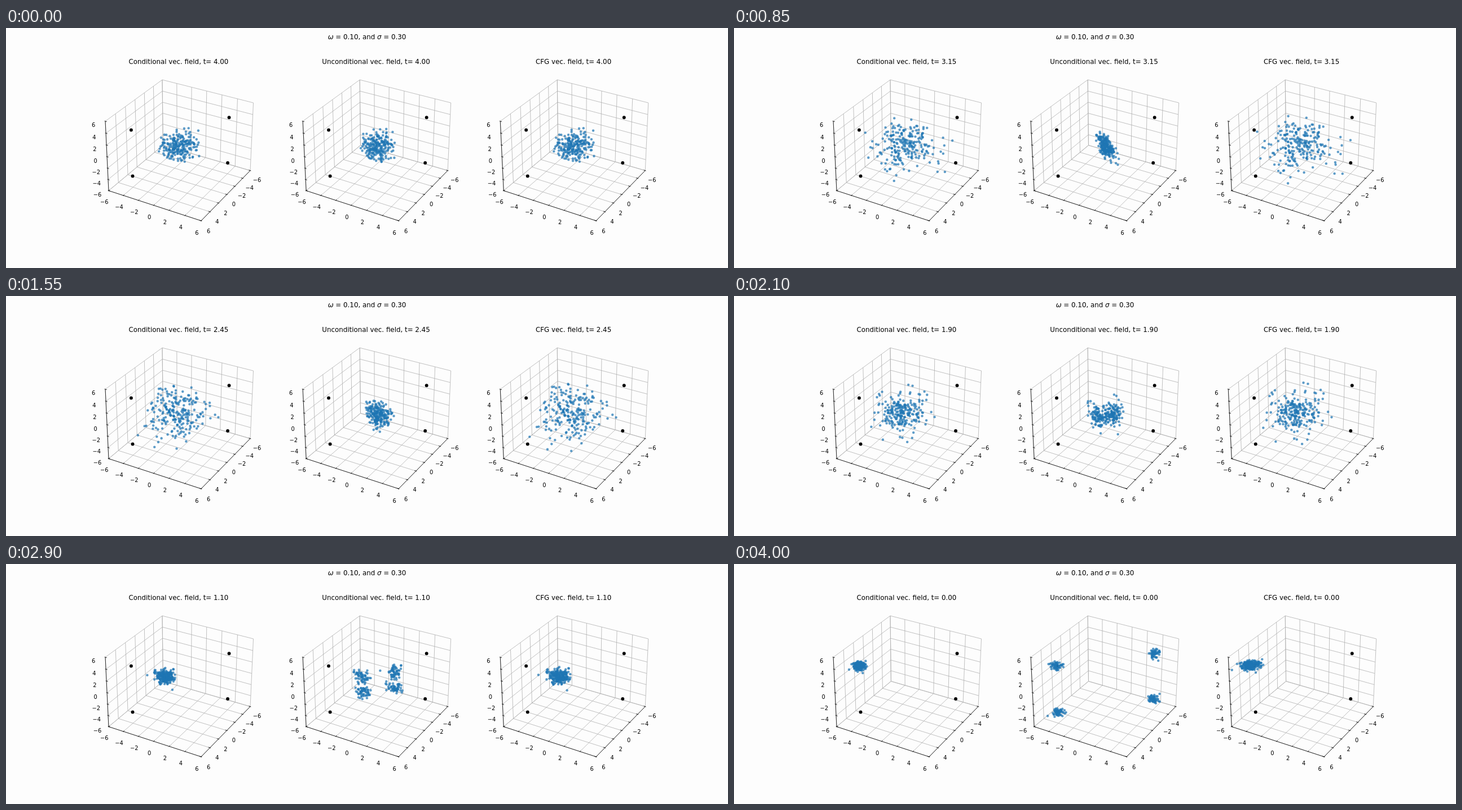
An HTML page with a canvas for the animation above (4.05 s loop, 1280x427 px).

```html
<!DOCTYPE html>
<html lang="en">
<head>
<meta charset="utf-8">
<title>Vector fields</title>
<style>
html, body { margin: 0; width: 100%; height: 100%; overflow: hidden; background: #fdfdfd; }
canvas { display: block; }
</style>
</head>
<body>
<canvas id="stage" width="1280" height="427"></canvas>
<script>
const ctx = document.getElementById('stage').getContext('2d');
const FRAMES = 81, FRAME_MS = 50, COUNT = 230;
const PT = 1280 / 18 / 72;            // pixels per typographic point
const PANEL_STEP = 350.118, TITLE_X = 305.88, TITLE_Y = 63.7;
const TICKS = [-6, -4, -2, 0, 2, 4, 6];
const LIMIT = 6, LABEL_GAP = 0.92;
const font = (points, style = '') => `${style} ${points * PT}px "DejaVu Sans", sans-serif`;

// Perspective view from azimuth 30 and elevation 30 degrees.
function project(x, y, z) {
  x *= 0.0992063; y *= 0.0992063; z *= 0.0744049;
  const right = -0.5 * x + 0.866025 * y;
  const up = -0.433013 * x - 0.25 * y + 0.866025 * z;
  const scale = 1577.4 / (10 - 0.75 * x - 0.433013 * y - 0.5 * z);
  return [309.83 + right * scale, 211.52 - up * scale];
}

// Seeded random numbers
let seed = 20817;
function random() {
  seed = (seed + 0x6D2B79F5) | 0;
  let r = Math.imul(seed ^ (seed >>> 15), 1 | seed);
  r = (r + Math.imul(r ^ (r >>> 7), 61 | r)) ^ r;
  return ((r ^ (r >>> 14)) >>> 0) / 4294967296;
}
const gauss = () => Math.sqrt(-2 * Math.log(1 - random())) * Math.cos(2 * Math.PI * random());

// Each particle carries three slowly wandering unit normals.
const KEEP = 0.92, KICK = Math.sqrt(1 - KEEP * KEEP);
const particles = Array.from({ length: COUNT }, (_, i) => {
  const path = [[gauss(), gauss(), gauss()]];
  while (path.length < FRAMES) path.push(path[path.length - 1].map(v => KEEP * v + KICK * gauss()));
  return { path, side: i % 2 ? 1 : -1, level: i % 4 < 2 ? 1 : -1 };
});

// Piecewise linear curve through [t, value] pairs with t ascending
function curve(pairs, t) {
  const i = Math.max(1, pairs.findIndex(p => p[0] >= t));
  const [t0, v0] = pairs[i - 1], [t1, v1] = pairs[i];
  return v0 + (v1 - v0) * (t - t0) / (t1 - t0);
}
const SPREAD = [[0, .32], [.7, .35], [1.1, .5], [1.5, .78], [1.9, 1.3], [2.45, 1.75], [3.4, 1.75], [4, 1]];
const SPREAD_SIDE = [[0, .34], [.7, .36], [1.5, .45], [1.9, .52], [2.45, .42], [3.15, .28], [3.6, .45], [4, .82]];
const SPREAD_LEVEL = [[0, .34], [.7, .36], [1.5, .62], [1.9, .65], [2.45, .55], [3.15, .35], [3.6, .6], [4, 1]];
const SPREAD_ALONG = [[0, .32], [.7, .38], [1.5, .6], [1.9, .85], [2.45, 1.2], [3.15, 1.45], [4, 1.05]];

// Coordinates: side = (1,-1,0)/√2, along = (1,1,0)/√2, level = z
const place = (side, along, level) =>
  project((along + side) * Math.SQRT1_2, (along - side) * Math.SQRT1_2, level);

const panels = [
  {
    name: 'Conditional',
    field(t) {
      const mean = 4 * Math.exp(-t), s = curve(SPREAD, t);
      return ([a, b, c]) => place(mean * Math.SQRT2 + s * a, s * b, mean + s * c);
    }
  },
  {
    name: 'Unconditional',
    field(t) {
      const mean = 4 * Math.exp(-t);
      const a0 = curve(SPREAD_SIDE, t), b0 = curve(SPREAD_ALONG, t), c0 = curve(SPREAD_LEVEL, t);
      return ([a, b, c], p) =>
        place(p.side * mean * Math.SQRT2 + a0 * a, b0 * b, p.level * mean + c0 * c);
    }
  },
  {
    name: 'CFG',
    field(t) {
      const mean = 4.3 * Math.exp(-t), s = curve(SPREAD, t) * (t < 3.9 ? 1.07 : 1);
      const wide = s + 0.22 * Math.exp(-1.5 * t);
      return ([a, b, c]) => place(mean * Math.SQRT2 + wide * a, s * b, mean * 0.98 + s * c);
    }
  }
];

function line(from, to) {
  ctx.moveTo(...project(...from));
  ctx.lineTo(...project(...to));
}

function strokeLines(color, draw) {
  ctx.beginPath();
  draw();
  ctx.strokeStyle = color;
  ctx.lineWidth = 0.8 * PT;
  ctx.stroke();
}

function dot([x, y], radius) {
  ctx.beginPath();
  ctx.arc(x, y, radius, 0, 2 * Math.PI);
  ctx.fill();
  ctx.stroke();
}

function drawAxes() {
  const L = LIMIT, out = L + LABEL_GAP;
  strokeLines('#b0b0b0', () => {
    for (const v of TICKS) {
      line([v, L, -L], [v, -L, -L]); line([v, -L, -L], [v, -L, L]);
      line([L, v, -L], [-L, v, -L]); line([-L, v, -L], [-L, v, L]);
      line([L, -L, v], [-L, -L, v]); line([-L, -L, v], [-L, L, v]);
    }
  });
  strokeLines('#000', () => {
    line([-L, L, -L], [L, L, -L]);
    line([L, -L, -L], [L, L, -L]);
    line([L, -L, -L], [L, -L, L]);
    for (const v of TICKS) {
      line([v, L - .2, -L], [v, L + .1, -L]);
      line([L - .2, v, -L], [L + .1, v, -L]);
      line([L, -L + .2, v], [L, -L - .1, v]);
    }
  });
  ctx.fillStyle = '#000';
  ctx.font = font(10);
  for (const v of TICKS) {
    const label = String(v).replace('-', '\u2212');
    for (const spot of [[v, out, -out], [out, v, -out], [out, -out, v]]) {
      const [x, y] = project(...spot);
      ctx.fillText(label, x, y + 7.9);
    }
  }
}

function drawHeading() {
  const parts = [['ω', 'italic'], [' = 0.10, and ', ''], ['σ', 'italic'], [' = 0.30', '']];
  const width = ([text, style]) => {
    ctx.font = font(12, style);
    return ctx.measureText(text).width;
  };
  let x = 640 - parts.reduce((sum, part) => sum + width(part), 0) / 2;
  ctx.textAlign = 'left';
  ctx.fillStyle = '#000';
  for (const part of parts) {
    const w = width(part);
    ctx.fillText(part[0], x, 20);
    x += w;
  }
  ctx.textAlign = 'center';
}

function drawPanel({ name, field }, frame) {
  const t = (FRAMES - 1 - frame) * 0.05;
  drawAxes();
  ctx.font = font(12);
  ctx.fillText(`${name} vec. field, t= ${t.toFixed(2)}`, TITLE_X, TITLE_Y);

  ctx.lineWidth = 1.5 * PT;
  ctx.strokeStyle = '#000';
  for (const z of [-4, 4]) {
    dot(project(4, -4, z), Math.sqrt(20) / 2 * PT);
    dot(project(-4, 4, z), Math.sqrt(20) / 2 * PT);
  }
  ctx.fillStyle = ctx.strokeStyle = 'rgba(31,119,180,0.6)';
  const locate = field(t);
  for (const p of particles) dot(locate(p.path[frame], p), Math.sqrt(10) / 2 * PT);
}

function render() {
  const frame = Math.floor(performance.now() / FRAME_MS) % FRAMES;
  ctx.fillStyle = '#fdfdfd';
  ctx.fillRect(0, 0, 1280, 427);
  drawHeading();
  panels.forEach((panel, i) => {
    ctx.save();
    ctx.translate(i * PANEL_STEP, 0);
    drawPanel(panel, frame);
    ctx.restore();
  });
  requestAnimationFrame(render);
}
render();
</script>
</body>
</html>
```
